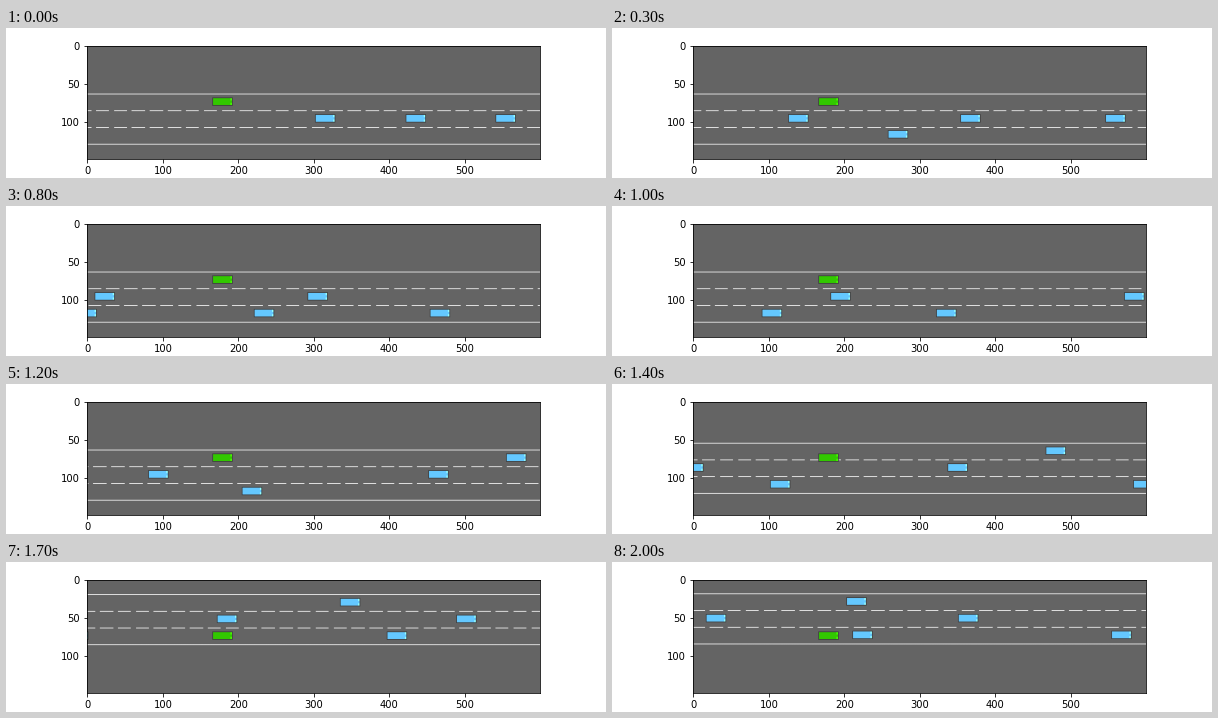
Animation, 600 px wide and 150 px high, one loop 2100 ms. Source, as a matplotlib script:

```python
from itertools import product
from math import floor

import numpy as np
import matplotlib.pyplot as plt
from matplotlib.animation import FuncAnimation

W, H, DPI = 600, 150, 72
FRAMES, INTERVAL = 21, 100
SCALE = 5.5                      # road pixels per metre
LANE = 4 * SCALE
STRIPE, SPACING = 3 * SCALE, 4.33 * SCALE
DRIFT = (7 * 4.33 - 30) * SCALE  # apparent stripe shift per step at 30 m/s
EGO_X, EGO_Y = 180, 75
EGO_SWERVE = LANE + 0.5          # the green car ends slightly past lane centre

ROAD, WHITE, OUTLINE = (100, 100, 100), (255, 255, 255), (60, 60, 60)
BLUE, GREEN = (100, 200, 255), (50, 200, 0)


def lane_change(n, start, length=2.35):
    t = np.clip((n - start) / length, 0, 1)
    return t * t * (3 - 2 * t)


class Car:
    """Passes x at the given step, falling back at a speed that may ease."""

    def __init__(self, lane, step, x, speed, ease=0, swerve=FRAMES):
        self.lane, self.step, self.x = lane, step, x
        self.speed, self.ease, self.swerve = speed, ease, swerve

    def at(self, n):
        t = n - self.step
        x = self.x - self.speed * t + self.ease * t * t
        return x, self.lane + lane_change(n, self.swerve)


TRAFFIC = [
    Car(1, 0, 316, 58.7),
    Car(1, 0, 436, 54.5, swerve=1),
    Car(1, 0, 555, 60, ease=-0.8),
    Car(1, 3, 560, 65, swerve=4),
    Car(1, 8, 306, 56.8, ease=1),
    Car(2, 8, 468, 69.4, ease=1.8),
    Car(1, 12, 466, 58.4, ease=0.5),
    Car(0, 12, 569, 44),
    Car(1, 15, 595, 46),
    Car(2, 15, 535, 62),
    Car(2, 20, 568, 62),
]


def fill(img, x, y, w, h, color):
    img[max(y, 0):max(y + h, 0), max(x, 0):max(x + w, 0)] = color


def draw_car(img, x, y, color):
    x, y = round(x), round(y)
    light = [min(int(c / 0.68), 255) for c in color]
    fill(img, x - 14, y - 6, 27, 11, OUTLINE)
    fill(img, x - 13, y - 5, 25, 9, color)
    for dy in (-5, 1):
        fill(img, x + 10, y + dy, 2, 3, light)


def draw_road(img, top, n):
    lines = [round(top + k * LANE) for k in range(4)]
    for y in (lines[0], lines[-1]):
        fill(img, 0, y, W, 1, WHITE)
    first = (DRIFT * (n - 18) - 4.6) % SPACING - SPACING
    for start, y in product(np.arange(first, W, SPACING), lines[1:3]):
        a, b = floor(start), floor(start + STRIPE)
        fill(img, a, y, b - a + 1, 1, WHITE)


def scene(n):
    img = np.full((H, W, 3), ROAD, dtype=np.uint8)
    # The view follows the green car through two lane changes
    swerve = lane_change(n, 13) + lane_change(n, 15)
    centre = round(EGO_Y - EGO_SWERVE * swerve)
    draw_road(img, centre - LANE / 2, n)
    for car in TRAFFIC:
        x, lane = car.at(n)
        draw_car(img, x, centre + LANE * lane, BLUE)
    draw_car(img, EGO_X, EGO_Y, GREEN)
    return img


fig = plt.figure(figsize=(W / DPI, H / DPI), dpi=DPI, facecolor="white")
ax = fig.add_subplot()
fig.subplots_adjust(left=0.125, right=0.9, bottom=0.125, top=0.88)
view = ax.imshow(scene(0))
ax.set_xticks(range(0, W, 100))
ax.set_yticks(range(0, H, 50))


def update(n):
    view.set_data(scene(n))
    return [view]


anim = FuncAnimation(fig, update, frames=FRAMES, interval=INTERVAL,
                     repeat=True, repeat_delay=0, blit=False)
plt.show()
```
